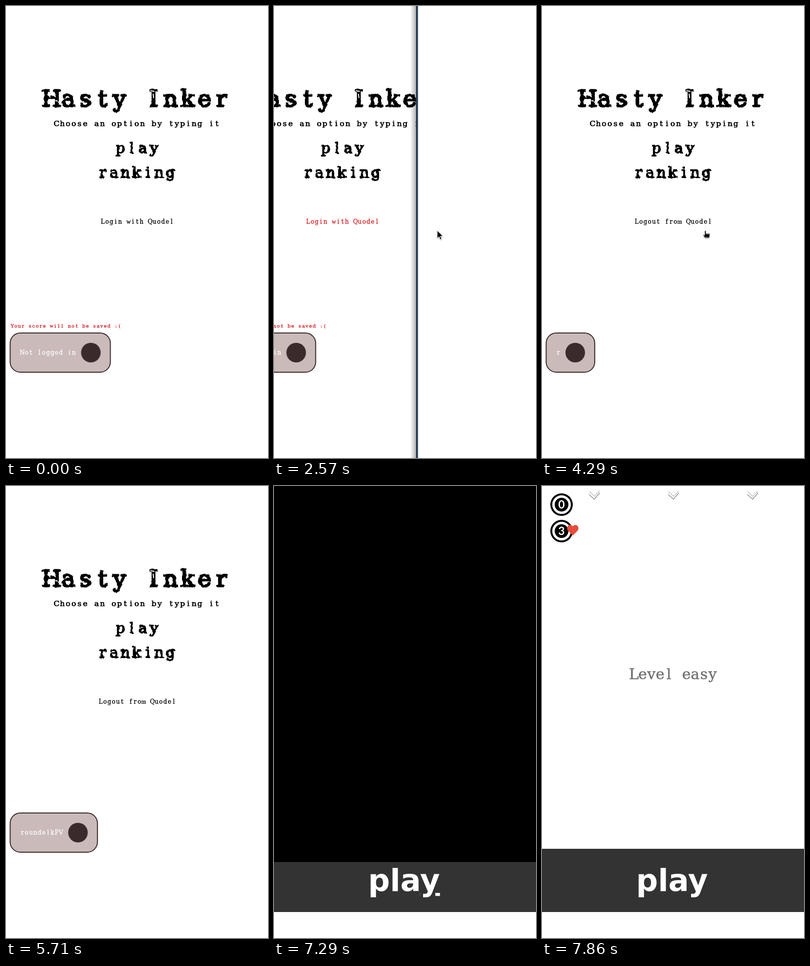
An HTML page that plays this animation: 536 by 922 pixels, repeating every 8000 ms.

```html
<!DOCTYPE html>
<html lang="en">
<head>
<meta charset="utf-8">
<title>Typing game menu</title>
<style>
  @property --edge { syntax: "<length>"; inherits: true; initial-value: 560px; }

  html, body { margin: 0; height: 100%; overflow: hidden; background: #fff; }
  svg { display: block; width: 100vw; height: 100vh; }

  /* A thin face thickened by its outline gives even, inky strokes. */
  .type {
    font-family: "DejaVu Serif", "Noto Serif", serif; text-anchor: middle;
    fill: var(--ink, #000); stroke: var(--ink, #000); stroke-linejoin: round;
  }
  .slim { font-family: "Liberation Serif", serif; }
  .title { font-size: 47px; stroke-width: 3.2px; }
  .option { font-size: 30px; stroke-width: 2px; }
  .hint { font-size: 15.5px; stroke-width: .7px; }
  .small { font-size: 12px; stroke-width: .3px; }
  .note { --ink: #d8141c; font-size: 10px; stroke-width: .3px; }
  .light { --ink: #fff; }
  .level { font-size: 30px; stroke-width: .6px; }
  .typed { font: 700 62.4px "DejaVu Sans", sans-serif; fill: #fff; text-anchor: middle; }
  .digit { font: 700 23px Lato, "Open Sans", sans-serif; fill: #fff; text-anchor: middle; }
  .last { text-decoration: underline; text-decoration-skip-ink: none; }

  .stage, .link, .card, .dot, .reveal, .pointer, .level { animation: 8s linear infinite; }
  .stage { animation-name: slide; }
  .page { transform: translateX(min(0px, calc((var(--edge) - 547px) / 2))); }
  .panel { transform: translateX(var(--edge)); }
  .link { animation-name: hover; animation-timing-function: step-end; }
  .card { animation-name: card; }
  .dot { animation-name: dot; }
  .reveal { animation-name: reveal; }
  .pointer { animation-name: pointer; }
  .level { animation-name: level; }

  @keyframes slide {
    0% { --edge: 560px; animation-timing-function: step-end; }
    26.75% { --edge: 452px; animation-timing-function: cubic-bezier(.4, .2, .7, .7); }
    32.125% { --edge: 291px; animation-timing-function: cubic-bezier(.3, .2, .7, .9); }
    37.5% { --edge: -14px; animation-timing-function: step-end; }
    41.125% { --edge: 40px; }
    48.25% { --edge: 452px; animation-timing-function: step-end; }
    50%, 100% { --edge: 560px; }
  }
  @keyframes hover {
    0% { --ink: #000; }
    21.5%, 100% { --ink: #d8141c; }
  }
  @keyframes card {
    0% { width: 205px; animation-timing-function: step-end; }
    53.625% { width: 99.4px; animation-timing-function: steps(9); }
    66.125%, 100% { width: 178.6px; }
  }
  @keyframes dot {
    0% { transform: translateX(105.6px); animation-timing-function: step-end; }
    53.625% { transform: none; animation-timing-function: steps(9); }
    66.125%, 100% { transform: translateX(79.2px); }
  }
  @keyframes reveal {
    0% { width: 0; animation-timing-function: step-end; }
    53.625% { width: 9.8px; animation-timing-function: steps(9); }
    66.125%, 100% { width: 89px; }
  }
  @keyframes pointer {
    0%, 16.125% { transform: translate(421px, 481px); animation-timing-function: ease-out; }
    23.25% { transform: translate(334px, 458px); animation-timing-function: step-end; }
    67.875% { transform: translate(400px, 545px); }
    71.375%, 100% { transform: translate(600px, 820px); }
  }
  @keyframes level {
    0%, 92.875% { opacity: 0; }
    98.25% { opacity: .55; }
    100% { opacity: .72; }
  }
</style>
</head>
<body>
<svg class="stage" viewBox="0 0 536 922">
  <defs>
    <filter id="rough" x="-5%" y="-15%" width="110%" height="130%" color-interpolation-filters="sRGB">
      <feTurbulence type="fractalNoise" baseFrequency=".14" numOctaves="2" seed="4"/>
      <feDisplacementMap in="SourceGraphic" scale="4" xChannelSelector="R" yChannelSelector="G"/>
    </filter>
    <linearGradient id="shade">
      <stop offset="0" stop-color="#000" stop-opacity="0"/>
      <stop offset="1" stop-color="#000" stop-opacity=".3"/>
    </linearGradient>
    <clipPath id="reveal"><rect class="reveal" x="28" y="690" width="0" height="34"/></clipPath>
    <g id="badge">
      <circle r="23"/>
      <circle r="16.5" fill="none" stroke="#fff" stroke-width="5"/>
    </g>
    <g id="chevron" fill="none" stroke-width="1.4">
      <path d="M-11 8L0 18 11 5" stroke="#8c8c8c" transform="translate(0 9)"/>
      <path d="M-10 2L0 12 11 1" stroke="#bdbdbd" transform="translate(0 9)"/>
    </g>
  </defs>

  <rect width="536" height="922" fill="#fff"/>

  <g class="page">
    <g filter="url(#rough)">
      <text class="type title" data-pitch="34.8" x="267" y="205">Hasty Inker</text>
      <text class="type option" data-pitch="22.9" x="268.5" y="299.5">play</text>
      <text class="type option" data-pitch="23" x="267" y="349.5">ranking</text>
    </g>
    <path d="M88 180l2 6M93 175l1 3M102 193l3 1M296 173l7 1M301 180l1 7M231 190l2 4M99 183l2 2"
      fill="none" stroke="#fff" stroke-width="2" stroke-linecap="round"/>
    <text class="type hint" data-pitch="11.72" x="267.5" y="245">Choose an option by typing it</text>

    <g data-on="0-4290">
      <text class="type small link" data-pitch="8.8" x="268.5" y="444">Login with Quodel</text>
      <text class="type note" data-pitch="7.32" x="122.5" y="656">Your score will not be saved :(</text>
    </g>
    <text class="type small" data-on="4290-8000" data-pitch="8.8" x="268.5" y="444">Logout from Quodel</text>

    <rect class="card" x="8.5" y="667" width="205" height="80" rx="21" fill="#cbbaba" stroke="#3b2a2b" stroke-width="2"/>
    <circle class="dot" cx="68" cy="707" r="20" fill="#3b2a2b"/>
    <text class="type small light" data-on="0-4290" data-pitch="8.8" x="86" y="711">Not logged in</text>
    <g data-on="4290-8000" clip-path="url(#reveal)">
      <text class="type small light" data-pitch="8.8" x="73" y="711">roundelkPV</text>
    </g>
  </g>

  <g class="panel">
    <rect x="-12" width="12" height="922" fill="url(#shade)"/>
    <rect width="580" height="922" fill="#fff"/>
    <rect width="4" height="922" fill="#14202c"/>
    <rect x="2" width="1.5" height="922" fill="#33567a"/>
  </g>

  <g data-on="1290-5710">
    <g class="pointer">
      <g data-on="1290-1720 2140-4290 5430-5710" style="filter:drop-shadow(0 1px 1px #0006)">
        <path d="M0 0V16L3.8 12.6 6.3 18.4 9 17.2 6.5 11.6H11.5Z" stroke="#fff"/>
      </g>
      <g data-on="1720-2140 4290-5430" style="filter:drop-shadow(0 1px 1px #0006)">
        <path d="M-1 1Q0-1 1.5 1V6H8Q9 6 9 8V12L7.5 15H-.5L-4 9.5Q-4 7.5-1 9.5Z" stroke="#fff" stroke-width=".8"/>
        <path d="M3.2 6v3M5.6 6v3M1.5 12v2M3.8 12v2" stroke="#fff" stroke-width=".6"/>
      </g>
    </g>
  </g>

  <rect data-on="7290-7430" width="536" height="767"/>
  <g data-on="7430-8000">
    <rect width="536" height="767" fill="#fff"/>
    <use href="#chevron" x="107"/>
    <use href="#chevron" x="269"/>
    <use href="#chevron" x="431"/>
    <use href="#badge" x="40" y="38"/>
    <use href="#badge" x="40" y="92"/>
    <text class="digit" x="40" y="46">0</text>
    <text class="digit" x="40" y="100">3</text>
    <path d="M63 101L53 91C48 84 56 75 63 82 70 75 78 84 73 91Z" fill="#e74c3c"/>
    <text class="type level" data-pitch="17.9" x="268.5" y="394">Level easy</text>
  </g>

  <g data-on="6860-8000">
    <rect y="740" width="536" height="129" opacity=".8"/>
    <text class="typed" data-on="6860-7000" x="267" y="826"><tspan class="last">p</tspan></text>
    <text class="typed" data-on="7000-7140" x="267" y="826">p<tspan class="last">l</tspan></text>
    <text class="typed" data-on="7140-7290" x="267" y="826">pl<tspan class="last">a</tspan></text>
    <text class="typed" data-on="7290-7430" x="266" y="826">pla<tspan class="last">y</tspan></text>
    <text class="typed" data-on="7430-8000" x="266" y="826">play</text>
  </g>
</svg>
<script>
  const LOOP = 8000;

  // Typewriter spacing: every character is centred in a cell of equal width.
  for (const el of document.querySelectorAll("[data-pitch]")) {
    const text = el.textContent, pitch = +el.dataset.pitch, mid = +el.getAttribute("x");
    const xs = [...text].map((c, i) => mid + (i - (text.length - 1) / 2) * pitch);
    el.setAttribute("x", xs.map(x => x.toFixed(2)).join(" "));
    el.innerHTML = text.replace(/[mw]/g, '<tspan class="slim">$&</tspan>');
  }

  // Hard on/off windows, given in milliseconds.
  for (const el of document.querySelectorAll("[data-on]")) {
    const key = (ms, opacity) => ({ offset: ms / LOOP, opacity, easing: "steps(1, end)" });
    const frames = [key(0, 0)];
    for (const span of el.dataset.on.split(" ")) {
      const [from, to] = span.split("-").map(Number);
      frames.push(key(from, 1), key(to, 0));
    }
    frames.push(key(LOOP, 0));
    el.animate(frames, { duration: LOOP, iterations: Infinity });
  }

  const start = document.timeline.currentTime || 0;
  for (const a of document.getAnimations()) a.startTime = start;
</script>
</body>
</html>
```
